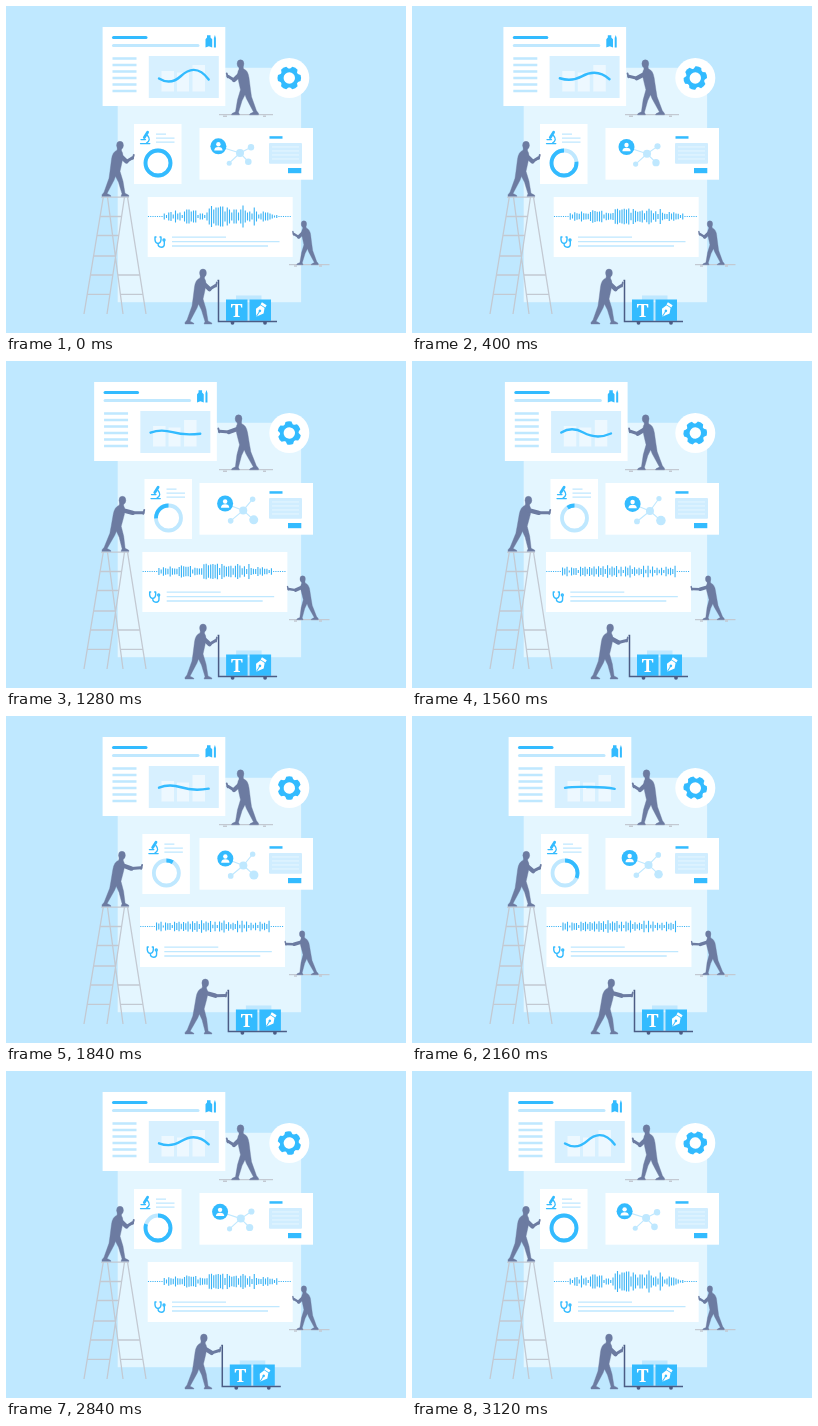
Write an HTML page that moves like this. It is 400 by 327 pixels and loops after 3.16 s.

```html
<!DOCTYPE html>
<html lang="en">
<head>
<meta charset="utf-8">
<title>Team assembling a page</title>
<style>
  html, body { margin: 0; width: 100%; height: 100%; overflow: hidden; background: #bfe8ff; }
  svg { display: block; width: 400px; height: 327px; }
  .white { fill: #fff; }
  .blue { fill: #33bbff; }
  .pale { fill: #bfe8ff; }
  .man { fill: #6c7ba1; stroke: #6c7ba1; stroke-width: .4; stroke-linejoin: round; }
  .arm { fill: none; stroke: #6c7ba1; stroke-linecap: round; stroke-linejoin: round; }
  .line { fill: none; stroke: #33bbff; stroke-linecap: round; stroke-linejoin: round; }
  .soft { fill: none; stroke: #bfe8ff; }
  .gray { fill: none; stroke: #c3c9d2; }
</style>
</head>
<body>
<svg viewBox="0 0 400 327">
  <rect width="400" height="327" class="pale"/>
  <rect x="111.700" y="61.800" width="183.400" height="234.400" fill="#e4f6ff"/>

  <g class="gray" stroke-width="1.300">
    <path d="M95 191.200H123M97.300 191L78 308M118.500 191L101 308M101.500 191L117 308M121.500 191L140 308"/>
    <path d="M94.200 210.500H115.600M91 229.500H112.800M87.600 250H109.700M84.400 269H106.800M81.200 288.300H104M112 269H133.800M114.500 288.300H136.900"/>
    <path d="M213 108.600H267M283 258.700H323.500"/>
    <path d="M217 110.300h4M257 110.300h3M288 260h3M313 260h3" stroke-width="1.500"/>
  </g>

  <circle cx="283.300" cy="72" r="20" class="white"/>
  <g id="gear">
    <g id="teeth" class="blue"></g>
    <circle r="7.600" fill="none" stroke="#33bbff" stroke-width="3.800"/>
  </g>

  <g id="report">
    <rect x="96.600" y="21" width="122.700" height="79" class="white"/>
    <rect x="106" y="30" width="35.500" height="3" rx="1.500" class="blue"/>
    <rect x="106" y="38" width="87.500" height="3" rx="1.500" class="pale"/>
    <path d="M106.500 52.500h24M106.500 59h24M106.500 65.500h24M106.500 72h24M106.500 78.500h24M106.500 85h24" class="soft" stroke-width="2.500"/>
    <rect x="142.800" y="50" width="70" height="42" fill="#d7f0ff"/>
    <path d="M155.500 65h12.500v20.500h-12.500zM171 66.500h12v19h-12zM186.500 59h12.500v26.500h-12.500z" fill="#edf8ff"/>
    <path id="curve" class="line" stroke-width="2.400"/>
    <path d="M201 29.300h3.500v2.200l1.700 1.800V41.500l-3.300-1.200l-3.400 1.200V33.300l1.500-1.800z" class="blue"/>
    <path d="M208.900 29l1 3v9.500h-2V32z" class="blue"/>
  </g>

  <g id="lab">
    <rect x="128" y="118" width="47.500" height="60" class="white"/>
    <g class="line" stroke-width="1.300">
      <path d="M134.500 137.600h9.300M141.500 129.500q4 4.500-1 7.500M135 133.600h4.500"/>
      <path d="M141.600 126.300l-3.300 5.200" stroke-width="2.800"/>
    </g>
    <path d="M150 128.200h10M150 132.200h18.500M150 136.200h18.500" class="soft" stroke-width="1.300"/>
    <circle cx="152" cy="157" r="12.500" class="soft" stroke-width="3.800"/>
    <circle id="ring" cx="152" cy="157" r="12.500" pathLength="100" transform="rotate(-90 152 157)" fill="none" stroke="#33bbff" stroke-width="3.800"/>
  </g>

  <rect x="193.500" y="122" width="113.500" height="51.700" class="white"/>
  <path d="M263.500 130.200h13v2.500h-13z" class="blue"/>
  <rect x="263" y="137" width="33" height="20.800" rx="1" fill="#d0edff"/>
  <path d="M266 141h27M266 145h27M266 149h27M266 153h27" stroke="#e6f6ff" stroke-width="1"/>
  <rect x="282" y="162" width="13.300" height="5.200" class="blue"/>
  <path id="links" class="soft" stroke-width="1.100"/>
  <g id="nodes" class="pale"></g>
  <g id="avatar">
    <circle r="8" class="blue"/>
    <circle cy="-2" r="2.200" class="white"/>
    <path d="M-4.200 4.200Q-4 .8 0 .8T4.200 4.200z" class="white"/>
  </g>

  <g id="sound">
    <rect x="141.700" y="191" width="145" height="60" class="white"/>
    <path id="wave" fill="none" stroke="#38b2f5" stroke-width="1.100"/>
    <g class="line" stroke-width="1.400">
      <path d="M150 231h-1v3q.5 3.500 3 3.500t3-3.500v-3h-1M152 237.500q0 3.700 3.300 3.700t3-3.700v-2"/>
      <circle cx="158" cy="234" r="1"/>
    </g>
    <path d="M166 231.200h54M166 235.600h107.500M166 240h96" class="soft" stroke-width="1.300"/>
  </g>

  <g id="cart">
    <rect x="230" y="289.500" width="25.500" height="5" class="pale"/>
    <rect x="220" y="293.500" width="21.500" height="21.300" class="blue"/>
    <rect x="243.500" y="293.500" width="21.500" height="21.300" class="blue"/>
    <text x="230.700" y="310.600" text-anchor="middle" font-family="'Noto Serif','Liberation Serif',serif" font-size="18" font-weight="700" class="white">T</text>
    <g transform="translate(254.300 304.200) rotate(32)">
      <path d="M-2.800-7.500h5.600v2.500h-5.600zM-2.400-4.200h4.800L4.500 1Q2.500 4 0 7.800Q-2.500 4-4.500 1z" class="white"/>
      <path d="M0 7.500V1" stroke="#33bbff" stroke-width=".9"/>
      <circle cy=".8" r="1.300" class="blue"/>
    </g>
    <path d="M211.500 274.500h1V315.500H271" fill="none" stroke="#4c5c85" stroke-width="1.500"/>
    <circle cx="226.500" cy="316.800" r="1.900" fill="#4c5c85"/>
    <circle cx="259" cy="316.800" r="1.900" fill="#4c5c85"/>
  </g>

  <g id="people"></g>
</svg>

<script>
const LOOP = 3160, STEP = 40;
const $ = id => document.getElementById(id);
const lerp = (a, b, k) => a + (b - a) * k;
const clamp = k => Math.min(1, Math.max(0, k));
const ease = k => (1 - Math.cos(Math.PI * clamp(k))) / 2;
const shift = (el, x, y = 0, extra = '') => el.setAttribute('transform', `translate(${x} ${y})${extra}`);

function add(parent, tag, attrs) {
  const el = document.createElementNS('http://www.w3.org/2000/svg', tag);
  for (const key in attrs) el.setAttribute(key, attrs[key]);
  return parent.appendChild(el);
}

// Moves from 0 to dist at time out, and back again at time back.
const MOVE = 640;
const trip = (t, dist, out, back) => dist * (ease((t - out) / MOVE) - ease((t - back) / MOVE));

for (let i = 0; i < 6; i++)
  add($('teeth'), 'path', { d: 'M8-4.200L11.300-3Q12.400 0 11.300 3L8 4.200z', transform: `rotate(${i * 60})` });

// A pusher facing right, standing with the feet around (0, 0).
function makeMan(x, y, size, dir) {
  const g = add($('people'), 'g', { transform: `translate(${x} ${y}) scale(${size * dir} ${size})` });
  const body = add(g, 'path', { class: 'man' });
  const head = add(g, 'ellipse', { class: 'man', cy: -51, rx: 3.4, ry: 4 });
  const upper = add(g, 'path', { class: 'arm', 'stroke-width': 4.4 });
  const lower = add(g, 'path', { class: 'arm', 'stroke-width': 3 });
  const palm = add(g, 'path', { class: 'arm', 'stroke-width': 1.8 });
  return px => {
    const reach = px * dir / size, lean = reach * .23;
    const p = (x, y) => `${x - lean * y / 51} ${y} `;
    body.setAttribute('d',
      'M' + p(2, -49) + 'L' + p(1.5, -46) + 'Q' + p(-3, -44.5) + p(-4, -37) +
      'L' + p(-5.5, -25) + p(-6.5, -18) + p(-11.5, -4) + p(-13.5, -1.5) + p(-13.5, 0) + p(-4.5, 0) + p(-5, -1) + p(-8.5, -2.8) +
      p(-1.5, -16) + p(0, -20) + p(3, -14) + p(6.5, -2.5) + p(5.5, 0) + p(13.5, 0) + p(13, -1.2) + p(9.5, -3) + p(7.5, -15) +
      p(4.5, -25) + p(6.5, -34) + 'Q' + p(8.5, -42) + p(6, -45.5) + 'L' + p(6, -48) + 'Z');
    head.setAttribute('cx', 4.5 + lean);
    const sx = 4 + lean * .8, hx = 18 + reach;
    const ex = lerp(sx, hx, .5), ey = -38.8 + Math.max(0, 4 - reach * .35);
    upper.setAttribute('d', `M${sx} -41.500L${ex} ${ey}`);
    lower.setAttribute('d', `M${ex} ${ey}L${hx - 1} -38.500`);
    palm.setAttribute('d', `M${hx + .3} -41.500L${hx - .7} -37.500`);
  };
}

const writer = makeMan(239, 108.800, 1, -1);
const climber = makeMan(109.500, 190.300, 1, 1);
const listener = makeMan(301.500, 258.800, .8, -1);
const carrier = makeMan(192.500, 318, 1, 1);

// Each node: start x, y, radius, then end x, y, radius.
const NODES = [
  [234, 147, 4, 238, 150, 4],
  [245, 141.300, 3.200, 247, 137.500, 2.600],
  [242.300, 155.700, 3.300, 249, 159.600, 4.800],
  [223.200, 157.200, 2.500, 225, 160.500, 2.900],
  [212.400, 140.300, 8, 220.700, 143, 8]
];
const dots = NODES.slice(0, 4).map(() => add($('nodes'), 'circle', {}));

function drawNetwork(k) {
  const now = NODES.map(n => [0, 1, 2].map(i => lerp(n[i], n[i + 3], k)));
  dots.forEach((dot, i) => ['cx', 'cy', 'r'].forEach((name, j) => dot.setAttribute(name, now[i][j])));
  const [hx, hy] = now[0];
  $('links').setAttribute('d', now.slice(1).map(n => `M${hx} ${hy}L${n[0]} ${n[1]}`).join(''));
  shift($('avatar'), now[4][0], now[4][1]);
}

function drawCurve(k) {
  const y = (a, b) => lerp(a, b, k);
  $('curve').setAttribute('d',
    `M153 ${y(72.500, 71.500)}C161 ${y(77.500, 66.500)} 168 ${y(76.500, 67.500)} 175 ${y(70, 71.500)}` +
    `S192 ${y(59, 77.500)} 202.700 ${y(73.500, 72.500)}`);
}

const BARS = [
  3, 1.5, 4, 4.5, 2, 6, 3, 4, 1.5, 5, 7, 7, 5, 6, 6, 1.5, 3, 3, 1.5, 4, 8, 10.5, 7, 9, 9, 10, 10,
  5, 9, 7, 4, 7, 7, 4, 7, 11, 6, 4, 5, 3, 9, 5, 2, 3, 5, 4, 4, 3, 2, 1, 1.5
];
// Loudness over time: 1 is the full profile, 0 an even, restless murmur.
const LEVELS = [[0, 1], [800, .25], [1280, .6], [1560, 0], [2160, 0], [2560, .2], [3120, 1], [LOOP, 1]];
const random = n => Math.abs(Math.sin(n * 12.9898) * 43758.5453) % 1;

function drawWave(t) {
  const i = LEVELS.findIndex(l => l[0] > t);
  const [t0, a] = LEVELS[i - 1], [t1, b] = LEVELS[i];
  const level = lerp(a, b, (t - t0) / (t1 - t0));
  let d = '';
  for (let n = 0; n < 64; n++) {
    const bar = BARS[n - 7] || 0;
    const murmur = bar && (n % 2 ? 3.5 : 1) + 2.8 * random(n);
    const h = Math.max(.6, lerp(murmur, bar, level));
    d += `M${142.500 + n * 2.250} ${210.500 - h}v${2 * h}`;
  }
  $('wave').setAttribute('d', d);
}

function draw(t) {
  const report = trip(t, -8.7, 40, 1210);
  const lab = trip(t, 10.5, 440, 1650);
  const sound = trip(t, -7.7, 880, 2060);
  const cart = trip(t, 10, 1240, 2470);
  shift($('report'), report);
  shift($('lab'), lab);
  shift($('sound'), sound);
  shift($('cart'), cart);
  writer(report);
  climber(lab);
  listener(sound);
  carrier(cart);

  const sway = 1 - Math.abs(1 - 2 * t / LOOP);
  drawNetwork(sway);
  drawCurve(sway);
  drawWave(t);
  shift($('gear'), 283.3, 72, ` rotate(${t / LOOP * 360})`);

  // The ring is wiped from its start, then drawn again.
  const from = clamp(t / 1720) * 100, to = clamp((t - 1720) / 1400) * 100;
  const dash = t < 1720 ? `0 ${from} ${100 - from} 0` : `${to} ${100 - to}`;
  $('ring').setAttribute('stroke-dasharray', dash);
}

const start = performance.now();
function tick() {
  const t = (performance.now() - start) % LOOP;
  draw(Math.floor(t / STEP) * STEP);
  requestAnimationFrame(tick);
}
tick();
</script>
</body>
</html>
```
